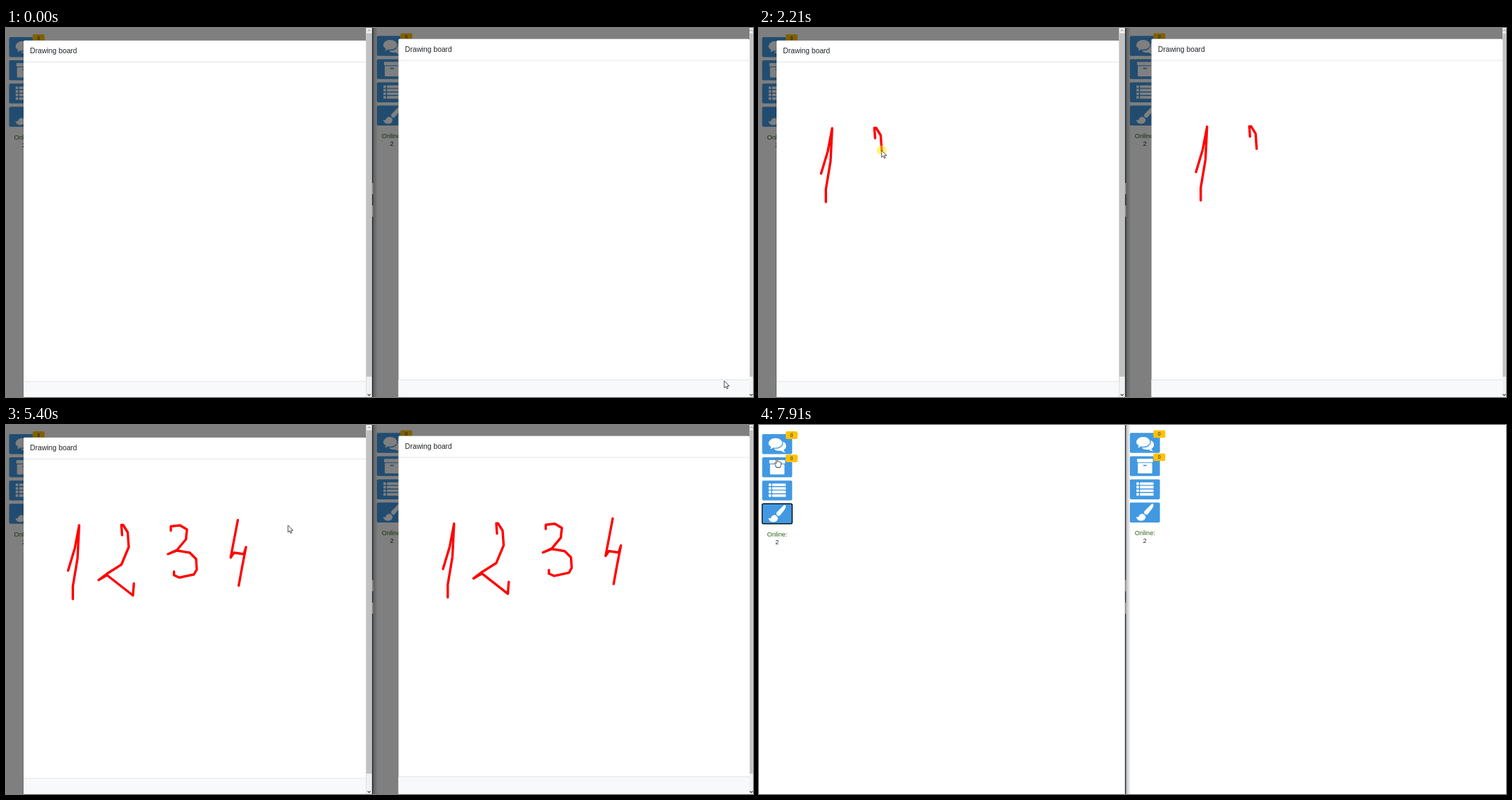
Write an HTML page that moves like this. It is 1065 px wide and 526 px high and loops after 8000 ms.

```html
<!DOCTYPE html>
<html lang="en">
<head>
<meta charset="utf-8">
<title>Shared drawing board</title>
<style>
  html, body { margin: 0; width: 100%; height: 100%; overflow: hidden; background: #fff; }
  svg { display: block; width: 100vw; height: 100vh; font-family: "Liberation Sans", Arial, sans-serif; }
  #ink { fill: none; stroke: #f00; stroke-width: 3.4; stroke-linecap: round; stroke-linejoin: round; }
  .focus { fill: none; stroke: #0b0f14; stroke-width: 1.4; }
</style>
</head>
<body>
<svg id="stage" viewBox="0 0 1065 526"></svg>
<script>
const LOOP = 8000, BLUE = '#4299e1';
const rect = (x, y, w, h, fill, r = 0) =>
  `<rect x="${x}" y="${y}" width="${w}" height="${h}" fill="${fill}" rx="${r}"/>`;

// Toolbar icons, relative to their button
const icons = [
  `<g transform="translate(0 .7)"><path d="M27 9.5c9 1 9 10 3.5 12.5q.5 1.8 3 3.2q-4 .3-6.5-2.2c-7 .8-11-2-11-6z"/>
   <path stroke="${BLUE}" stroke-width="1.3" d="M18.8 4.3c14 0 14 15.2 0 15.2q-1.8 0-3-.3q-2.5 2-6.3 2.1q2.3-1.8 2.5-3.6c-7-4-2.5-13.4 6.8-13.4z"/></g>`,
  rect(10.2, 3.8, 22.6, 5, '#fff', 1) + rect(11.2, 9.9, 20.6, 14.6, '#fff', 1) +
    rect(18.8, 12.3, 5.4, 1.8, BLUE, .9),
  [0, 1, 2, 3].map(i => rect(9.3, 4.2 + i * 5.1, 3.6, 3.7, '#fff', .5) +
    rect(14.3, 4.2 + i * 5.1, 19.4, 3.7, '#fff', .5)).join(''),
  `<path d="M33 2Q35 4 31.5 9L26 16Q23.500 19 20.500 15.500Q19.500 14 21 12L30 3Q31.800 1.200 33 2z
   M18 16Q21.500 17 22.500 20.500Q22 26 15.500 26Q10 26 8.800 20Q11.500 22 12.500 20Q14 16 18 16z"/>`
];

const badge = y => rect(38, y, 17, 10.8, '#ffc107', 1.8) +
  `<text x="46.5" y="${y + 7.8}" font-size="7" text-anchor="middle" fill="#212529">0</text>`;

const toolbar = (id, x, y) => `<g transform="translate(${x} ${y})">
  ${icons.map((icon, i) => `<g transform="translate(4.5 ${13 + i * 33.1})" fill="#fff">
    ${rect(0, 0, 42.8, 28.4, BLUE, 1.8)}${icon}</g>`).join('')}
  <rect id="focus${id}" class="focus" x="4.5" y="112.3" width="42.8" height="28.4" rx="2"/>
  ${badge(9.1)}${badge(42.2)}
  <g text-anchor="middle" font-size="9.15">
    <text x="26" y="158.7" fill="#33621f">Online:</text>
    <text x="25.8" y="169.8" fill="#212529">2</text>
  </g></g>`;

const modal = (id, x, y, right) => `<g transform="translate(${x} ${y})"><g id="modal${id}">
  ${rect(24.5, 17.3, right - 24.5, 520, 'rgba(0,0,0,.3)', 1.5)}
  ${rect(25, 17.8, right - 25, 520, '#fff', 1.5)}
  ${rect(25, 48, right - 25, .9, '#dee2e6')}
  ${rect(25, 503.6, right - 25, 30, '#f7f9fa')}
  ${rect(25, 503.4, right - 25, .9, '#dee2e6')}
  <text x="34.3" y="36" font-size="10.3" fill="#212529">Drawing board</text>
  <use href="#ink"/></g></g>`;

const scrollbar = (id, x, w) => `<g id="bar${id}">${rect(x, 0, w, 526, '#f1f1f1')}
  ${rect(x + .4, 7.5, w - .8, 489.5, '#c1c1c1')}
  <g fill="none" stroke-width="1.2"><path stroke="#aaa" d="M${x + w / 2 - 2} 4.5l2-2l2 2"/>
  <path stroke="#444" d="M${x + w / 2 - 2} 522l2 2l2-2"/></g></g>`;

const panel = (id, x, w, bar, tools, board) => `<g clip-path="url(#clip${id})">
  <clipPath id="clip${id}">${rect(x, 0, w, 526, '#fff')}</clipPath>
  ${rect(x, 0, w, 526, '#fff')}${toolbar(id, ...tools)}
  <rect id="shade${id}" x="${x}" width="${w}" height="526"/>
  ${modal(id, ...board)}${scrollbar(id, ...bar)}</g>`;

// Pointer route: [start, end, path]. A path from M is a pen stroke, others travel from the last point.
const route = [
  [40, 290, 'L99 257'],
  [400, 800, 'L89 208'],
  [870, 1500, 'M88.5 207.5L98 176L104.3 143L102 190L95.3 230V248'],
  [1560, 1660, 'L165.5 157'],
  [1973, 2884, 'M165.5 157L164.5 142.5H167L173.5 153L175 174L164.5 199L144 212L132 221L144 214L181 243L182.3 226'],
  [2970, 3200, 'L235 150.5'],
  [3317, 3872, 'M235 150.5V144.5L248 143L258 149L256.5 163L244 178L231 184L244 179L262 182L271 191L272 206L268 213L247 217.5L239.5 214V209'],
  [3980, 4240, 'L330.5 135.5'],
  [4330, 4900, 'M330.5 135.5L320.3 189L325 182L339 184L342.2 174L336.5 203L331.8 229'],
  [4980, 5080, 'L402 143'],
  [5690, 5800, 'L529 89'],
  [6560, 7100, 'L11.5 201.5'],
  [7290, 7880, 'Q24 -40 25.5 48']
];
const clicks = [[5970, 6070], [7150, 7270]];

let end = { x: 1024, y: 503 };
const acts = route.map(([from, to, d]) => {
  const pen = d[0] === 'M', path = document.createElementNS('http://www.w3.org/2000/svg', 'path');
  path.setAttribute('d', pen ? d : `M${end.x} ${end.y}${d}`);
  const length = path.getTotalLength();
  end = path.getPointAtLength(length);
  if (pen) {
    path.setAttribute('pathLength', 1);
    clicks.push([from - 90, to + 60]);
  }
  return { from, to, pen, path, length };
});

document.getElementById('stage').innerHTML = `
  <defs><g id="ink"/>
  <linearGradient id="edge"><stop stop-opacity=".28"/><stop offset="1" stop-opacity="0"/></linearGradient></defs>
  ${panel('L', 0, 522, [513.3, 8.7], [0, 0], [0, 0, 513.3])}
  ${panel('R', 522, 543, [1060, 5], [524.3, -1.7], [534.5, -2.3, 525.5])}
  ${rect(523, 0, 7, 526, 'url(#edge)')}${rect(521.8, 0, 1.4, 526, '#1d2a35')}
  ${[221, 253].map(y => rect(521.8, y, 1.6, 16, 'rgba(255,255,255,.45)')).join('')}
  <g id="pointer"><circle id="press" r="7" fill="#fe0" opacity=".52"/>
    <g fill="#fff" stroke="#222" stroke-width=".8" stroke-linejoin="round">
      <path id="arrow" d="M0 0V10L2.3 7.9L3.8 11.3L5.4 10.6L4 7.3H7.2z"/>
      <path id="hand" d="M-1 .6Q0-.8 1 .6V4.5Q2 3.400 2.900 4.700Q4 3.800 4.600 5.200Q5.500 4.300 6 5.400V8.500L4.800 12.500H-.6L-3 7.400Q-3.800 5.800-2.400 5.800L-1 7z"/>
    </g></g>`;

const el = Object.fromEntries([...document.querySelectorAll('[id]')].map(e => [e.id, e]));
el.ink.append(...acts.filter(a => a.pen).map(a => a.path));

const clamp = v => Math.max(0, Math.min(1, v));
const smooth = p => p * p * (3 - 2 * p);
const show = (e, on) => e.setAttribute('visibility', on ? 'visible' : 'hidden');

// The board slides up and fades first, then the dark backdrop clears.
function closing(id, t, start, span) {
  const p = (t - start) / span, board = clamp(p / .55);
  el['modal' + id].setAttribute('opacity', 1 - board);
  el['modal' + id].setAttribute('transform', `translate(0 ${-25 * board})`);
  el['shade' + id].setAttribute('opacity', .5 * (1 - clamp((p - .5) / .5)));
  show(el['bar' + id], p < 1);
}

function render(t) {
  let tip = acts[0].path.getPointAtLength(0);
  for (const { from, to, pen, path, length } of acts) {
    const p = clamp((t - from) / (to - from));
    if (t >= from) tip = path.getPointAtLength(length * (pen ? p : smooth(p)));
    if (pen) {
      path.setAttribute('stroke-dasharray', `${p} 2`);
      show(path, p > 0);
    }
  }
  closing('R', t, 5980, 280);
  closing('L', t, 7250, 100);
  show(el.focusR, t >= 6260 && t < 7130);
  show(el.focusL, t >= 7340);
  const hover = t > 7350 && tip.y < 140;
  el.pointer.setAttribute('transform', `translate(${tip.x} ${tip.y})`);
  show(el.press, clicks.some(([a, b]) => t >= a && t < b));
  show(el.arrow, !hover);
  show(el.hand, hover);
}

const begin = performance.now();
function tick() {
  render((performance.now() - begin) % LOOP);
  requestAnimationFrame(tick);
}
tick();
</script>
</body>
</html>
```
